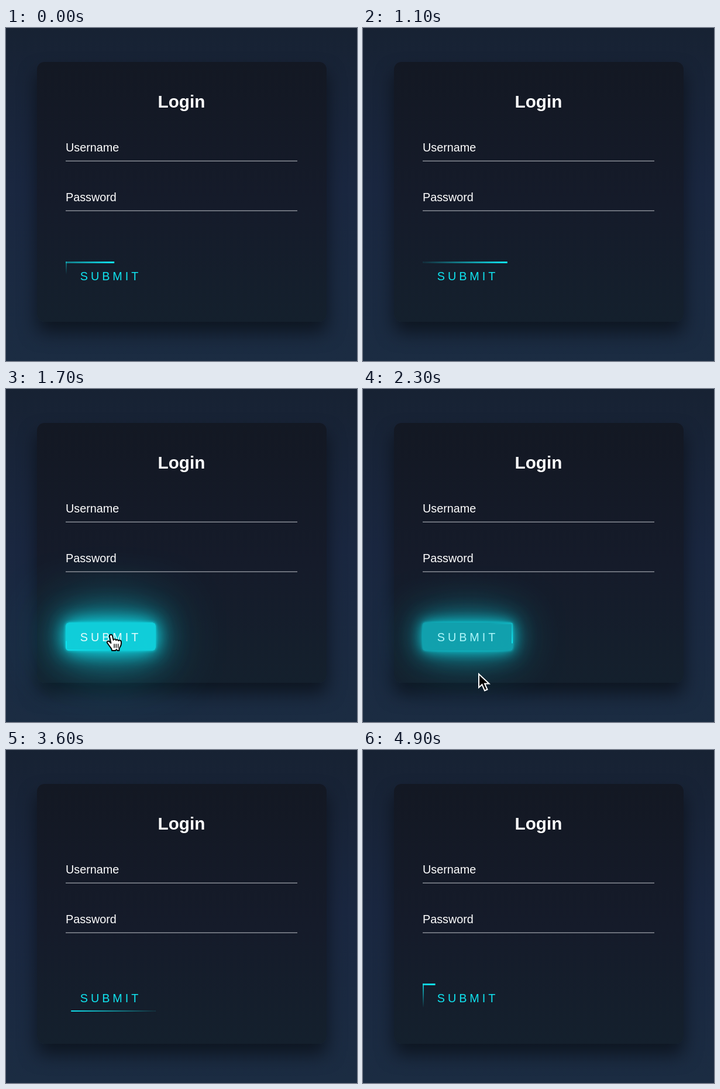
Write an HTML page that moves like this. It is 600x569 px and loops after 5 s.

```html
<!DOCTYPE html>
<html lang="en">
<head>
<meta charset="utf-8">
<title>Login form</title>
<style>
  html, body { margin: 0; width: 100%; height: 100%; overflow: hidden; }
  body {
    position: relative;
    background: linear-gradient(#172233, #1a2740 48%, #1b2c42);
  }
  .card {
    position: absolute; left: 52.5px; top: 58px; width: 495px; height: 444px;
    border-radius: 12.4px;
    background: linear-gradient(#131823, #151b2a 55%, #14202d);
    box-shadow: 0 18.6px 31px rgba(0, 0, 0, .5);
  }
  .button {
    position: absolute; left: 102px; top: 399.3px; width: 154px; height: 48px;
    overflow: hidden;
  }
  .button i { position: absolute; }
  .top, .bottom { left: 0; width: 100%; height: 2.475px; }
  .left, .right { top: 0; width: 2.475px; height: 100%; }
  .top { top: 0; background: linear-gradient(90deg, transparent, #10e4f0); }
  .right { right: 0; background: linear-gradient(180deg, transparent, #10e4f0); }
  .bottom { bottom: 0; background: linear-gradient(270deg, transparent, #10e4f0); }
  .left { left: 0; background: linear-gradient(360deg, transparent, #10e4f0); }
  svg { position: absolute; left: 0; top: 0; }
  text { font: 19.8px "Liberation Sans", Arial, sans-serif; fill: #fff; }
  .title { font-size: 29.7px; font-weight: bold; text-anchor: middle; }
  .submit { letter-spacing: 4.95px; }
</style>
</head>
<body>
<div class="card"></div>
<div class="button" id="button">
  <i class="top"></i><i class="right"></i><i class="bottom"></i><i class="left"></i>
</div>
<svg width="600" height="569" viewBox="0 0 600 569">
  <text class="title" x="300" y="136">Login</text>
  <text x="102" y="211">Username</text>
  <text x="102" y="296">Password</text>
  <g fill="#8f939c">
    <rect x="102" y="226.6" width="396" height="1.4"/>
    <rect x="102" y="311.6" width="396" height="1.4"/>
  </g>
  <text class="submit" id="label" x="126.75" y="431">SUBMIT</text>
  <g id="arrow">
    <path d="M1 1V24L6.5 19L11 29.5L15.5 27.5L11 17.5H18.5Z" stroke="#fff" stroke-width="2"/>
  </g>
  <g id="hand" stroke="#000" stroke-linejoin="round" stroke-linecap="round">
    <path fill="#fff" stroke-width="1.9" d="M-2 3C-2.6-1 2.4-1.5 3 2L4.6 9C5 6.8 8.6 6.8 9 9.4
      C9.6 7.6 12.8 7.8 13.2 10.4C14 8.8 18 9 18 12.5C18.3 17 17.5 19 15.5 21.5
      Q14 23.5 14.5 27H11.5L10 25L8 27H2Q1.8 24 0 22L-5.5 14.5C-8 11-3.8 9.4-1.6 12.4L.4 14.2Z"/>
    <path fill="none" stroke-width="1.4" d="M6 16v6M9.3 16v6M12.6 16v6"/>
  </g>
</svg>
<script>
  const LOOP = 5000, STEP = 100;
  const ENTER = 1400, LEAVE = 2190, FADE = 500;
  const CYAN = [16, 228, 240];
  const BLURS = [6.2, 31, 62, 124];
  const PHASE = 0.135;

  // Pointer path: time, x, y
  const PATH = [
    [1100, 195, 600], [1200, 190, 504], [1300, 186, 455], [1400, 182, 430],
    [1500, 179, 420], [1900, 179, 420], [2100, 184, 430], [2200, 190, 455],
    [2300, 197, 486], [2400, 204, 528], [2500, 210, 560], [2600, 216, 600]
  ];

  const byId = id => document.getElementById(id);
  const button = byId('button'), label = byId('label');
  const arrow = byId('arrow'), hand = byId('hand');
  const edges = [...button.children];

  const clamp = v => Math.max(0, Math.min(1, v));
  const mix = (a, b, k) => a + (b - a) * k;

  // CSS "ease": cubic-bezier(.25, .1, .25, 1)
  function ease(x) {
    x = clamp(x);
    const curve = (a, b, s) => 3 * a * s * (1 - s) ** 2 + 3 * b * s * s * (1 - s) + s ** 3;
    let lo = 0, hi = 1;
    for (let i = 0; i < 24; i++) {
      const s = (lo + hi) / 2;
      if (curve(.25, .25, s) < x) lo = s; else hi = s;
    }
    return curve(.1, 1, lo);
  }

  function hoverAt(t) {
    return t < LEAVE ? ease((t - ENTER) / FADE) : 1 - ease((t - LEAVE) / FADE);
  }

  function drawEdges(t) {
    edges.forEach((edge, i) => {
      const q = (t / 1000 + PHASE - i / 4 + 1) % 1;
      const shift = (Math.min(q * 2, 1) * 2 - 1) * 100 * (i < 2 ? 1 : -1);
      edge.style.transform = `translate${i % 2 ? 'Y' : 'X'}(${shift}%)`;
    });
  }

  function drawHover(k) {
    const glow = `rgba(${CYAN}, ${k})`;
    button.style.background = glow;
    button.style.borderRadius = 6.2 * k + 'px';
    button.style.boxShadow = k > 0 ? BLURS.map(b => `0 0 ${b * k}px ${glow}`).join() : 'none';
    label.style.fill = `rgb(${CYAN.map(c => Math.round(mix(c, 255, k)))})`;
  }

  function drawPointer(t) {
    const n = PATH.findIndex(p => p[0] > t);
    const shown = n > 0;
    const over = t >= ENTER && t < LEAVE;
    arrow.style.display = shown && !over ? '' : 'none';
    hand.style.display = shown && over ? '' : 'none';
    if (!shown) return;
    const [a, b] = [PATH[n - 1], PATH[n]];
    const k = (t - a[0]) / (b[0] - a[0]);
    const move = `translate(${mix(a[1], b[1], k)} ${mix(a[2], b[2], k)})`;
    arrow.setAttribute('transform', move);
    hand.setAttribute('transform', move);
  }

  function draw(t) {
    drawEdges(t);
    drawHover(hoverAt(t));
    drawPointer(t);
  }

  const start = performance.now();
  function tick() {
    // The picture advances in even steps, with a little slack for timer jitter
    const t = Math.floor((performance.now() - start + 15) / STEP) * STEP;
    draw(t % LOOP);
    requestAnimationFrame(tick);
  }
  tick();
</script>
</body>
</html>
```
